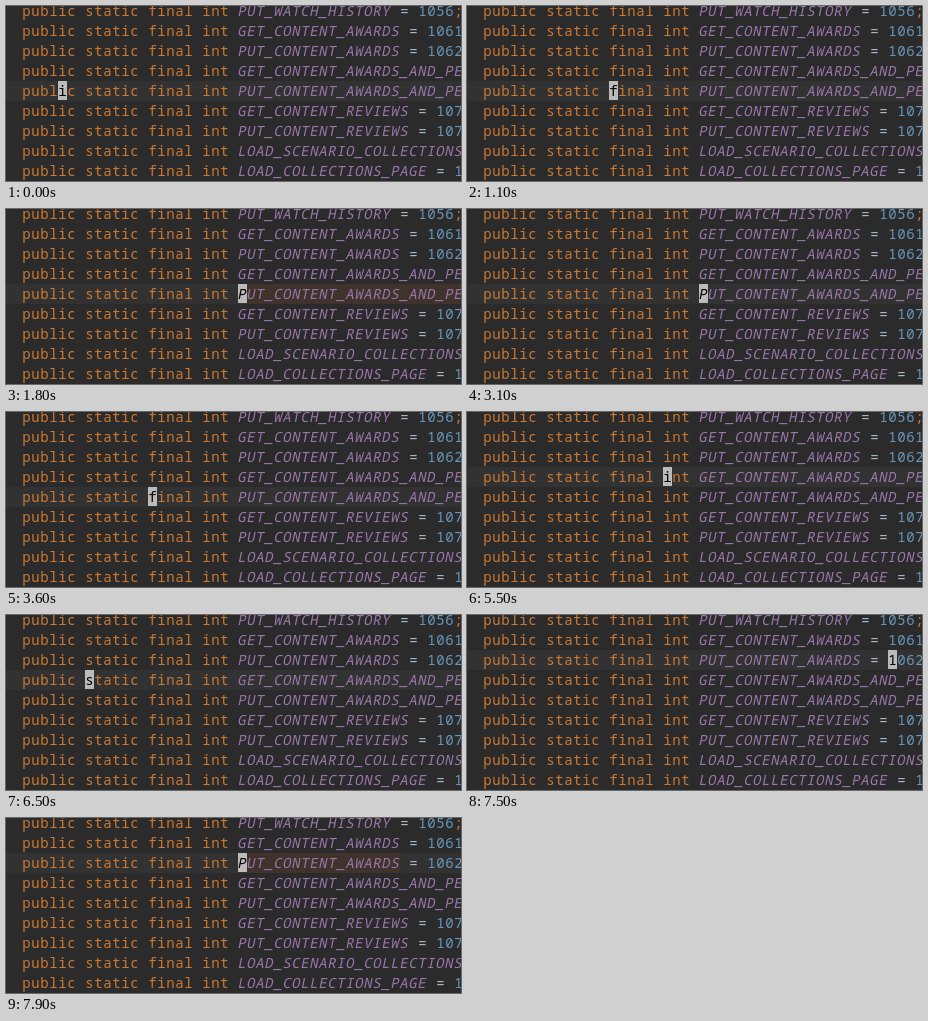
These frames come from a looping animation (455 px wide and 175 px high, 8 s). An HTML page with a canvas:

```html
<!DOCTYPE html>
<html lang="en">
<head>
<meta charset="utf-8">
<title>Moving by word in an editor</title>
<style>
  html, body { margin: 0; width: 100%; height: 100%; overflow: hidden; background: #2b2b2b; }
  canvas { display: block; }
</style>
</head>
<body>
<canvas id="view" width="455" height="175"></canvas>
<script>
const canvas = document.getElementById('view');
const ctx = canvas.getContext('2d');

const LOOP = 8000, LEFT = 16, TOP = -5, CHAR = 9, LINE = 20, BASE = 15;
const FONT = '14px "Noto Sans Mono", "DejaVu Sans Mono", monospace';
const SPACING = 0.6;             // 14px glyphs advance 8.4px on a 9px grid
const SLANT = 0.2, MIDDLE = 5;   // names lean around half the capital height
const COLOR = {
  back: '#2b2b2b', band: '#323232', mark: '#40332b', caret: '#bbbbbb', ink: '#000000',
  keyword: '#cc7832', name: '#9876aa', number: '#6897bb', plain: '#a9b7c6'
};

const PREFIX = 'public static final int ';
const constants = [
  ['PUT_WATCH_HISTORY', 1056],
  ['GET_CONTENT_AWARDS', 1061],
  ['PUT_CONTENT_AWARDS', 1062],
  ['GET_CONTENT_AWARDS_AND_PERSONS', 1063],
  ['PUT_CONTENT_AWARDS_AND_PERSONS', 1064],
  ['GET_CONTENT_REVIEWS', 1071],
  ['PUT_CONTENT_REVIEWS', 1072],
  ['LOAD_SCENARIO_COLLECTIONS', 1081],
  ['LOAD_COLLECTIONS_PAGE', 1091]
];

// Caret columns of the words; HIDDEN is past the right edge or blinked off.
const PUBLIC = 0, STATIC = 7, FINAL = 14, INT = 20, NAME = 24, EQUALS = 43, VALUE = 45, HIDDEN = 60;

// [start time, row, column]
const moves = [
  [0, 4, 4], [500, 4, HIDDEN], [700, 4, STATIC], [1100, 4, FINAL],
  [1500, 4, INT], [1800, 4, NAME], [2100, 4, HIDDEN], [3100, 4, NAME],
  [3300, 4, INT], [3600, 4, FINAL], [3900, 4, STATIC], [4300, 4, PUBLIC],
  [4700, 3, PUBLIC], [5100, 3, STATIC], [5300, 3, FINAL], [5500, 3, INT],
  [5700, 3, NAME], [6100, 3, INT], [6300, 3, FINAL], [6500, 3, STATIC],
  [6600, 3, PUBLIC], [6800, 2, HIDDEN], [7500, 2, VALUE], [7600, 2, EQUALS],
  [7800, 2, NAME]
];

// [from, to] spans in which the name on the current row is highlighted
const marks = [[1800, 2200], [3200, 3400], [5800, 6200], [7900, LOOP]];

const colX = col => LEFT + col * CHAR;
const rowY = row => TOP + row * LINE;

function fill(color, x, y, w, h) {
  ctx.fillStyle = color;
  ctx.fillRect(x, y, w, h);
}

function drawRow(row, ink) {
  const [name, value] = constants[row];
  let col = 0;
  const put = (text, color, slant = 0) => {
    ctx.save();
    ctx.font = FONT;
    ctx.letterSpacing = SPACING + 'px';
    ctx.fillStyle = ink || color;
    ctx.translate(colX(col) + SPACING / 2, rowY(row) + BASE);
    ctx.transform(1, 0, -slant, 1, -slant * MIDDLE, 0);
    ctx.fillText(text, 0, 0);
    ctx.restore();
    col += text.length;
  };
  put(PREFIX, COLOR.keyword);
  put(name, COLOR.name, SLANT);
  put(' = ', COLOR.plain);
  put(String(value), COLOR.number);
  put(';', COLOR.keyword);
}

function drawCaret(row, col) {
  const x = colX(col), y = rowY(row);
  ctx.save();
  ctx.beginPath();
  ctx.rect(x, y, CHAR, LINE - 1);
  ctx.clip();
  fill(COLOR.caret, x, y, CHAR, LINE);
  drawRow(row, COLOR.ink);
  ctx.restore();
}

function draw(time) {
  const [, row, col] = moves.findLast(move => move[0] <= time);
  fill(COLOR.back, 0, 0, canvas.width, canvas.height);
  fill(COLOR.band, 0, rowY(row), canvas.width, LINE);
  if (marks.some(([from, to]) => time >= from && time < to)) {
    fill(COLOR.mark, colX(NAME), rowY(row), constants[row][0].length * CHAR, LINE);
  }
  constants.forEach((_, i) => drawRow(i));
  drawCaret(row, col);
}

const start = performance.now();
function tick() {
  draw((performance.now() - start) % LOOP);
  requestAnimationFrame(tick);
}
tick();
</script>
</body>
</html>
```
